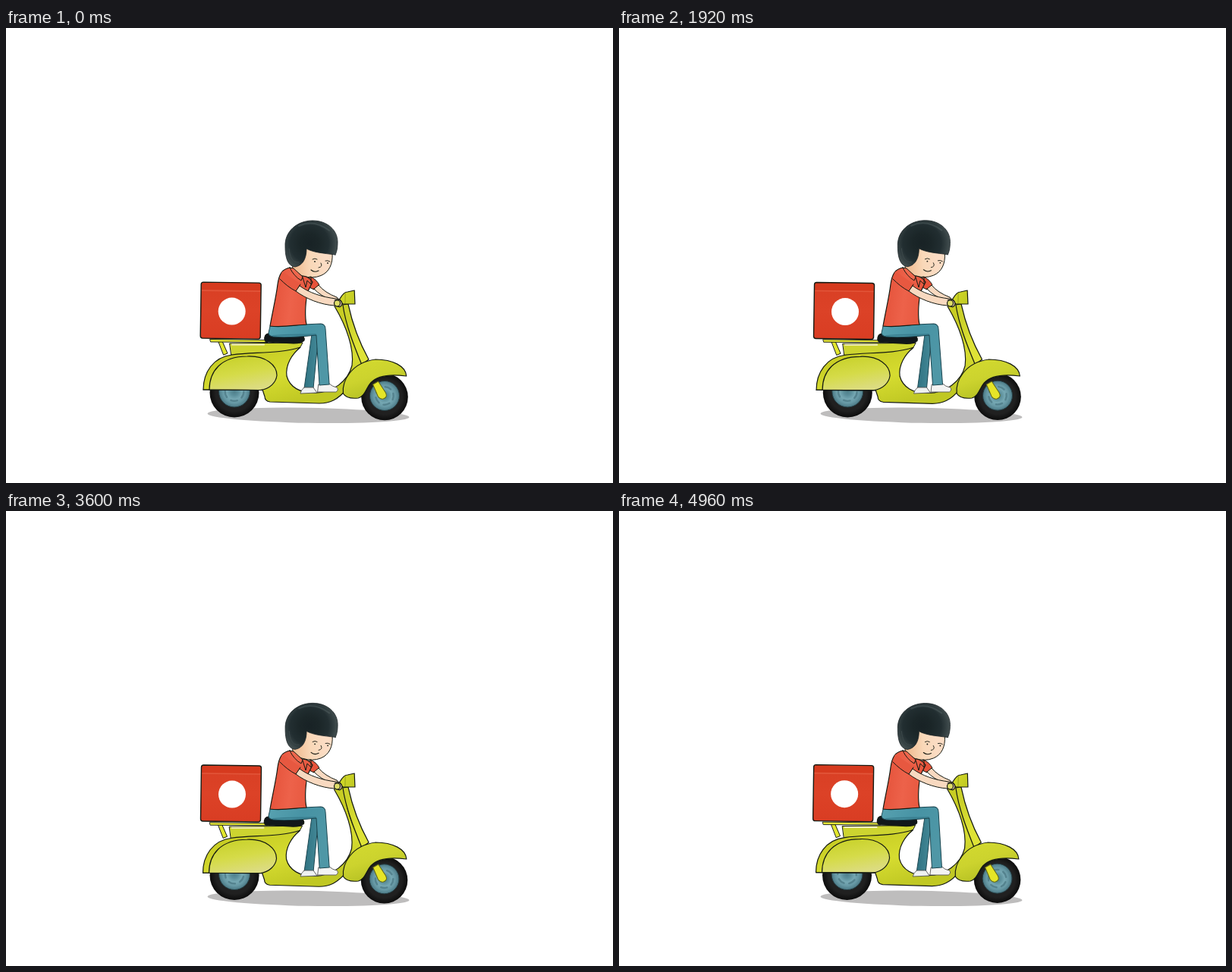
An HTML page with a canvas that plays this animation: 800x600 px, repeating every 5 s.

```html
<!DOCTYPE html>
<html lang="en">
<head>
<meta charset="utf-8">
<title>Delivery scooter</title>
<style>
html, body { margin: 0; width: 100%; height: 100%; overflow: hidden; background: #fff; }
canvas { display: block; }
</style>
</head>
<body>
<canvas id="stage" width="800" height="600"></canvas>
<script>
const ctx = document.getElementById('stage').getContext('2d');
const LOOP = 5000, STEP = 40, TAU = Math.PI * 2;
const INK = '#151a12', SKIN = '#f8d9c0', DENIM = '#1c4650';

function linear(x0, y0, x1, y1, ...colors) {
  const g = ctx.createLinearGradient(x0, y0, x1, y1);
  colors.forEach((c, i) => g.addColorStop(i / (colors.length - 1), c));
  return g;
}

function radial(x, y, r, ...colors) {
  const g = ctx.createRadialGradient(x, y, 0, x, y, r);
  colors.forEach((c, i) => g.addColorStop(i / (colors.length - 1), c));
  return g;
}

function shape(d, fill, stroke = INK, width = 1.2) {
  const p = new Path2D(d);
  if (fill) { ctx.fillStyle = fill; ctx.fill(p); }
  if (stroke) { ctx.strokeStyle = stroke; ctx.lineWidth = width; ctx.stroke(p); }
}

const line = (d, width = 1.2, color = INK) => shape(d, null, color, width);

function disc(x, y, r, fill, stroke, width = 1) {
  ctx.beginPath();
  ctx.arc(x, y, r, 0, TAU);
  ctx.fillStyle = fill;
  ctx.fill();
  if (stroke) { ctx.strokeStyle = stroke; ctx.lineWidth = width; ctx.stroke(); }
}

function moved([dx, dy], draw) {
  ctx.save();
  ctx.translate(dx, dy);
  draw();
  ctx.restore();
}

// Leans a part sideways while its point at pivotY stays put.
function leaning(amount, pivotY, draw) {
  ctx.save();
  ctx.transform(1, 0, amount, 1, -amount * pivotY, 0);
  draw();
  ctx.restore();
}

// Engine shake: whole cycles per loop, so it closes seamlessly.
function shake(t, seed, amount) {
  const a = t / LOOP * TAU;
  const wave = k => 0.6 * Math.sin(a * (17 + k)) + 0.4 * Math.sin(a * (29 + 2 * k));
  return [amount * wave(seed), amount * wave(seed + 5)];
}

function wheelie(t) {
  const p = (t - 2040) / 520;
  return p > 0 && p < 1 ? 0.1 * Math.sin(p * Math.PI) ** 2 : 0;
}

function wheel(x, y, r, hub, angle) {
  ctx.save();
  ctx.translate(x, y);
  disc(0, 0, r, radial(0, 0, r, '#111', '#161616', '#202020', '#202020', '#0c0c0c'));
  ctx.translate(0, -1.5);
  disc(0, 0, hub, radial(0, 0, hub, '#4f7f8b', '#5c8f9b', '#76a8b3', '#6698a4', '#4b7985'), '#243c42');
  ctx.rotate(angle);
  ctx.strokeStyle = 'rgba(58,100,112,.5)';
  ctx.lineWidth = 2.4;
  for (let i = 0; i < 5; i++) {
    ctx.beginPath();
    ctx.arc(0, 0, hub * 0.6, i * TAU / 5, i * TAU / 5 + 0.7);
    ctx.stroke();
  }
  ctx.restore();
}

function crate() {
  const outline = 'M261 334 L334 335 Q337 335 337 338 L336 406 Q336 409 333 409 L260 408 Q257 408 257 405 L258 337 Q258 334 261 334Z';
  shape(outline, linear(0, 334, 0, 409, '#d83f24', '#dc4227', '#d93d23'), null);
  shape('M259 335 L336 336 L336 345 L258 344Z', '#d63a1e', null);
  line('M259 345 L336 346', 1.6, 'rgba(236,106,78,.5)');
  line(outline, 1.4);
  disc(298.5, 372.5, 18, '#fff');
}

function rearBody() {
  shape('M280 413 L285 413 L292 429 L287 431Z', '#e2e62c', INK, 1);
  shape('M269 410.5 L345 411.5 L345 414.5 L270 414Z', '#e5e638', INK, 0.9);
  shape('M295 416 L391 415 Q389 420 385 424 L330 432 L297 431Z', '#cdd430', INK, 1);
  line('M298 417.4 L340 417.4', 2, '#f4f1c5');
  shape('M342 405 Q344 402 349 403 L389 405 Q394 407 393 412 Q390 416 379 416 L343 414 Q339 411 342 405Z', '#11171a');
}

function frame() {
  shape('M260 477 C260 454 273 434 298 431 C326 427 360 430 388 421 C377 430 368 444 370 459 C374 474 388 481 405 481 C431 482 451 465 456 445 C459 423 449 394 433 367 L438 360 L446 362 C447 389 458 418 468 435 C471 449 461 464 450 475 C437 491 426 495 413 495 L348 493 Q341 492 341 486 L338 477Z',
    linear(350, 420, 370, 495, '#c8cd24', '#d6dc30', '#c0c823'));
  shape('M268 477 C268 453 283 433 318 433 C343 432 357 445 357 458 C356 467 348 476 335 477.5Z',
    linear(300, 434, 308, 478, '#c9d22c', '#d5db48', '#dcdc80'));
  line('M260 477 L338 477.5');
}

function steering() {
  shape('M444 365 L451 364 C456 386 466 414 479 437 L470 444 C459 418 448 391 444 365Z',
    linear(446, 395, 470, 410, '#cbd12a', '#dee236'));
  shape('M440 357 Q445 348 450 348 L459 346 L460 364 L444 364 L438 359Z',
    linear(440, 350, 460, 360, '#d4da28', '#c1ca24'));
  line('M447 349 L447 363', 0.8, '#8b9518');
}

function frontFender() {
  shape('M446 482 C444 466 456 441 488 437 C511 437 528 446 529 459 C507 456 490 459 482 468 C476 475 475 485 466 488 C456 489 449 487 446 482Z',
    linear(470, 438, 485, 485, '#d2d92f', '#ccd32e', '#b7c224'));
  shape('M485 470 L492 466 L502 481 Q505 487 499 489 Q495 490 492 486Z', '#e5e528', '#636815', 1);
}

function legs() {
  shape('M403 404 L412 404 L406 475 L394 475Z', linear(396, 420, 411, 420, '#327584', '#438897'), DENIM, 1);
  shape('M394 474 L406 474 L411 481 L389 482 Q390 477 394 474Z', '#eef1f1', '#555', 0.9);
  shape('M413 470 L427 469 Q431 473 437 474 Q440 477 436 480 L412 480Z', '#f3f3f2', '#555', 0.9);
  shape('M348 393 C368 394 394 390 415 390 Q421 391 421 397 L427 470 L414 471 L409 405 C390 407 367 409 352 407 Q346 406 346 402Z',
    linear(348, 390, 425, 430, '#57a1b0', '#4793a4', '#4f97a6'), DENIM, 1);
  line('M352 406 C374 404 391 405 408 404', 2, 'rgba(34,94,110,.4)');
}

function torso() {
  shape('M401 328 Q409 331 413 339 L406 345 L396 340Z', '#e75239', INK, 1);
  shape('M406 344 L412 339 Q420 349 436 355 L440 360 L431 360 Q414 353 406 344Z', SKIN, INK, 1);
  shape('M374 316 C364 318 360 324 358 338 C356 355 351 375 348 393 C364 395 380 392 396 391 C393 377 395 362 397 349 L404 335 Q399 327 390 327Z',
    linear(354, 355, 397, 360, '#e6553d', '#ed624a', '#e85940'));
  shape('M387 340 C399 349 417 355 435 357 Q443 357 443 364 Q441 370 433 366 C415 365 395 357 382 347Z', SKIN, INK, 1);
  shape('M364 321 Q373 327 388 337 L382 347 C374 343 364 337 361 331Z', '#e75840', null);
  line('M361 331 C367 337 374 343 382 347 L388 338', 1);
  shape('M374 316 L379 317 L391 328 L389 333 Q379 327 374 316Z', '#ef674d', INK, 1);
  line('M391 329 L395 342 L397 333 L402 338 L402 328', 1);
  disc(436.5, 363, 4, '#dfdd68', INK, 1.2);
  line('M433 359 Q440 356 443 363 Q443 368 439 368', 1);
}

function head() {
  shape('M378 312 C376 319 381 325 391 327 Q404 331 415 326.5 C426 322 431 311 430 297 L395 289 Q392 302 386 311Z',
    linear(382, 314, 421, 312, '#f0bd94', '#f9d8b8', '#fbdcc4'), INK, 1);
  line('M404 305 Q407 303 410 305', 0.9);
  line('M421 307 Q424 306 427 308', 0.9);
  disc(407, 308, 0.9, INK);
  disc(424, 310, 0.9, INK);
  line('M415 310 Q418 315 412 316', 0.9);
  line('M402 319 Q406 323 412 320', 1.1);
  shape('M434 299 C418 297 405 296 396 291 C396 301 393 313 381 315 C371 314 368 302 368 288 C367 268 384 254 404 254 C424 254 437 267 437 282 C437 290 436 295 434 299Z',
    radial(400, 284, 38, '#182225', '#1b2628', '#222e31', '#455152'), '#1b2325', 0.8);
  line('M373 291 C374 301 377 310 386 309', 1, '#3c484a');
  line('M386 261 Q406 252 426 267', 2, 'rgba(117,130,130,.25)');
}

function scooter(t) {
  const tilt = wheelie(t);
  const spin = t / LOOP * TAU * 12;
  const headLag = 103 * (tilt - wheelie(t - 60));
  const body = shake(t, 2, 0.5);
  const box = shake(t, 7, 0.6);
  const skull = shake(t, 11, 0.8);
  const lean = shake(t, 4, 0.01)[0] - 0.013;

  ctx.save();
  ctx.translate(300, 490);
  ctx.rotate(-tilt);
  ctx.translate(-300, -490);
  moved(shake(t, 4, 0.5), () => wheel(301, 481, 32.5, 20.5, spin));
  moved(shake(t, 9, 0.5), () => wheel(499, 486.5, 30.8, 19.5, spin + 1));
  moved(body, () => { rearBody(); frame(); });
  leaning(lean, 360, () => { steering(); frontFender(); });
  moved([box[0] - 0.8, box[1] + 1.1], crate);
  leaning(lean, 400, legs);
  moved([skull[0], skull[1] + headLag], head);
  torso();
  ctx.restore();
}

function draw(t) {
  ctx.fillStyle = '#fff';
  ctx.fillRect(0, 0, 800, 600);
  ctx.beginPath();
  ctx.ellipse(398.5, 510.8, 133, 10, 0.018, 0, TAU);
  ctx.fillStyle = '#bebdbd';
  ctx.fill();
  scooter(t);
}

ctx.lineJoin = ctx.lineCap = 'round';
const start = performance.now();

function tick() {
  const elapsed = (performance.now() - start) % LOOP;
  draw(Math.floor(elapsed / STEP) * STEP);
  requestAnimationFrame(tick);
}

tick();
</script>
</body>
</html>
```
